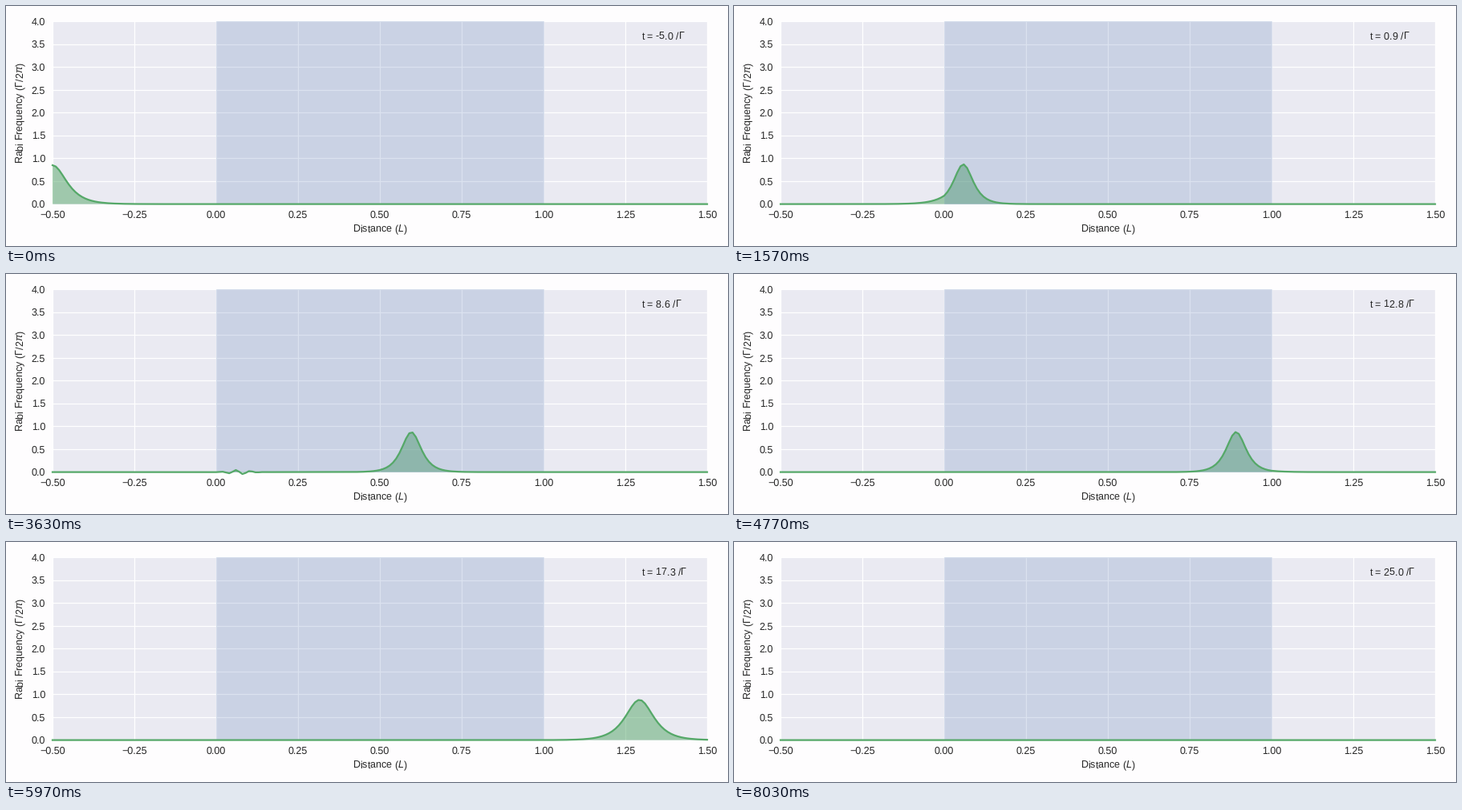
A matplotlib script that plays this animation: 900 by 300 pixels, repeating every 8.06 s.

```python
import numpy as np
import matplotlib.pyplot as plt
from matplotlib.animation import FuncAnimation

W, H, DPI = 900, 300, 100
FRAMES, LOOP_MS = 242, 8060
PAPER, INK, PANEL = "#FEFDFE", "#262626", "#EAEAF2"
BLUE, GREEN = "#4C72B0", "#55A868"

LIGHT_SPEED = 0.1          # medium lengths per lifetime
PULSE_WIDTH = 1 / 2.634    # sech width for unit FWHM

plt.rcParams.update({
    "font.family": "Liberation Sans",
    "font.size": 9,
    "text.color": INK,
    "text.hinting": "no_hinting",
    "mathtext.fontset": "custom",
    "mathtext.rm": "Liberation Sans",
    "mathtext.it": "Liberation Sans:italic",
})

z = np.linspace(-0.5, 1.5, 201)
times = np.linspace(-5, 25, FRAMES)

inside = np.clip(z, 0, 1)
delay = 4.32 * inside + 0.03 * np.tanh(inside / 0.1)
peak = np.interp(z, [-0.5, 0.05, 1.3], [0.85, 0.87, 0.88])
ripple = (0.05 * np.exp(-((z - 0.07) / 0.04) ** 2)
          * np.cos(2 * np.pi * (z - 0.06) / 0.045))


def rabi(t):
    """Pulse slowed by the medium, with a faint wake near its entrance."""
    phase = (t - z / LIGHT_SPEED - delay) / PULSE_WIDTH
    wake = ripple * np.exp(-((t - 9) / 2) ** 2)
    return peak / np.cosh(phase) + wake


fig = plt.figure(figsize=(W / DPI, H / DPI), dpi=DPI, facecolor=PAPER)
ax = fig.add_axes([58 / W, 1 - 247.6 / H, 816 / W, 228.6 / H],
                  facecolor=PANEL)
ax.set_axisbelow(True)
ax.grid(color="white", lw=0.9)
for spine in ax.spines.values():
    spine.set_visible(False)
ax.tick_params(length=0, pad=6.3, labelcolor=INK)
ax.tick_params(axis="x", pad=5.6)

# The medium tints the pulse area but not its outline.
area, = ax.fill(z, 0 * z, facecolor=GREEN, alpha=0.5, lw=0, zorder=1)
ax.axvspan(0, 1, color=BLUE, alpha=0.2, lw=0.5, zorder=1.5)
curve, = ax.plot(z, 0 * z, color=GREEN, lw=1.6, clip_on=False, snap=False)
clock = ax.text(0.9, 0.9, "", transform=ax.transAxes)

ax.set(xlim=(-0.5, 1.5), ylim=(0, 4),
       xticks=np.arange(-0.5, 1.51, 0.25), yticks=np.arange(0, 4.1, 0.5))
fig.text(466 / W, 1 - 283 / H, "Distance ($L$)", ha="center")
fig.text(19.3 / W, 1 - 134 / H, r"Rabi Frequency ($\Gamma / 2\pi$)",
         rotation=90, ha="center", va="center")


def draw(i):
    t = times[i]
    y = rabi(t)
    curve.set_ydata(y)
    area.set_xy(np.column_stack([np.r_[z, z[-1], z[0]], np.r_[y, 0, 0]]))
    clock.set_text(rf"t = {t:.1f} /$\Gamma$")
    return area, curve, clock


anim = FuncAnimation(fig, draw, frames=FRAMES, interval=LOOP_MS / FRAMES,
                     repeat=True, repeat_delay=0)
plt.show()
```
